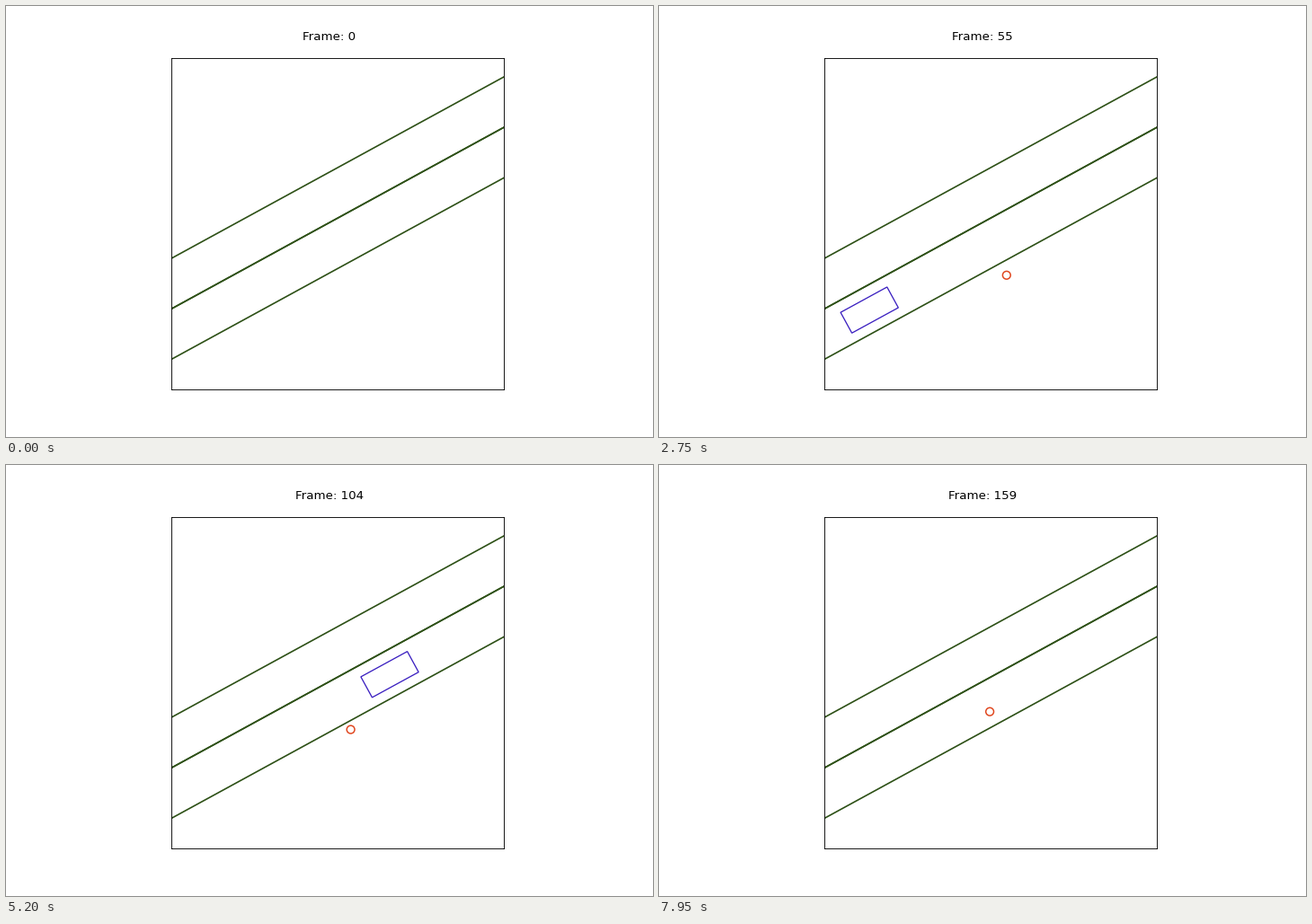
A matplotlib script for the animation above (8000 ms loop, 720x480 px).

```python
import numpy as np
import matplotlib.pyplot as plt
from matplotlib.animation import FuncAnimation
from matplotlib.patches import Circle, Polygon

W, H, DPI = 720, 480, 80
PT = 72 / DPI                      # points per pixel
LEFT, RIGHT, TOP, BOTTOM = 184.2, 553.8, 57.6, 427.2
ANGLE = 0.5                        # road heading, radians
CAR_LEN, CAR_WID = 58.9, 26.2
CAR_START = 50                     # first frame with the car
FRAMES, INTERVAL = 160, 50

fig = plt.figure(figsize=(W / DPI, H / DPI), dpi=DPI, facecolor="white")
ax = fig.add_axes([LEFT / W, 1 - BOTTOM / H, (RIGHT - LEFT) / W, (BOTTOM - TOP) / H])
ax.set(xlim=(LEFT, RIGHT), ylim=(BOTTOM, TOP), xticks=[], yticks=[])
title = fig.text(0.5, 0.92, "Frame: 0", fontsize=12, ha="center", va="baseline")

# Two lanes; the shared border is drawn once for each.
xs = np.array([LEFT - 10, RIGHT + 10])
for y0 in (281.0, 337.2, 337.2, 393.4):
    ax.plot(xs, y0 - np.tan(ANGLE) * (xs - LEFT), color="#2d5016", lw=1.5)

forward = np.array([np.cos(ANGLE), -np.sin(ANGLE)])
side = np.array([np.sin(ANGLE), np.cos(ANGLE)])
corners = np.array([a * forward * CAR_LEN / 2 + b * side * CAR_WID / 2
                    for a, b in ((-1, -1), (1, -1), (1, 1), (-1, 1))])

car = ax.add_patch(Polygon(corners, fill=False, ec="#3a1fc0", lw=1.3 * PT, zorder=2.2))
walker = ax.add_patch(Circle((0, 0), 4.4, fill=False, ec="#e0461e", lw=1.5 * PT, zorder=2.3))

# Walker: waits at the kerb, then sets off once the car has passed.
WALK_T = [1, 21, 55, 73, 104, 132, 138, 146, 153, 159]
WALK_X = [386.0, 386.2, 386.8, 385.8, 383.6, 380.8, 379.4, 375.8, 371.9, 368.1]
WALK_Y = [301.6, 300.9, 299.8, 297.8, 294.6, 290.7, 288.8, 284.3, 279.4, 274.7]


def car_center(i):
    x = 234.2 + 3.935 * (i - 55) - 0.1 * max(i - 104, 0)
    return np.array([x, 338.6 - np.tan(ANGLE) * (x - 234.2)])


def update(i):
    title.set_text(f"Frame: {i}")
    walker.set_visible(i > 0)
    walker.center = np.interp(i, WALK_T, WALK_X), np.interp(i, WALK_T, WALK_Y)
    car.set_visible(i >= CAR_START)
    car.set_xy(corners + car_center(i))
    return title, walker, car


anim = FuncAnimation(fig, update, frames=FRAMES, interval=INTERVAL,
                     init_func=lambda: update(0), repeat=True, repeat_delay=0)
plt.show()
```
